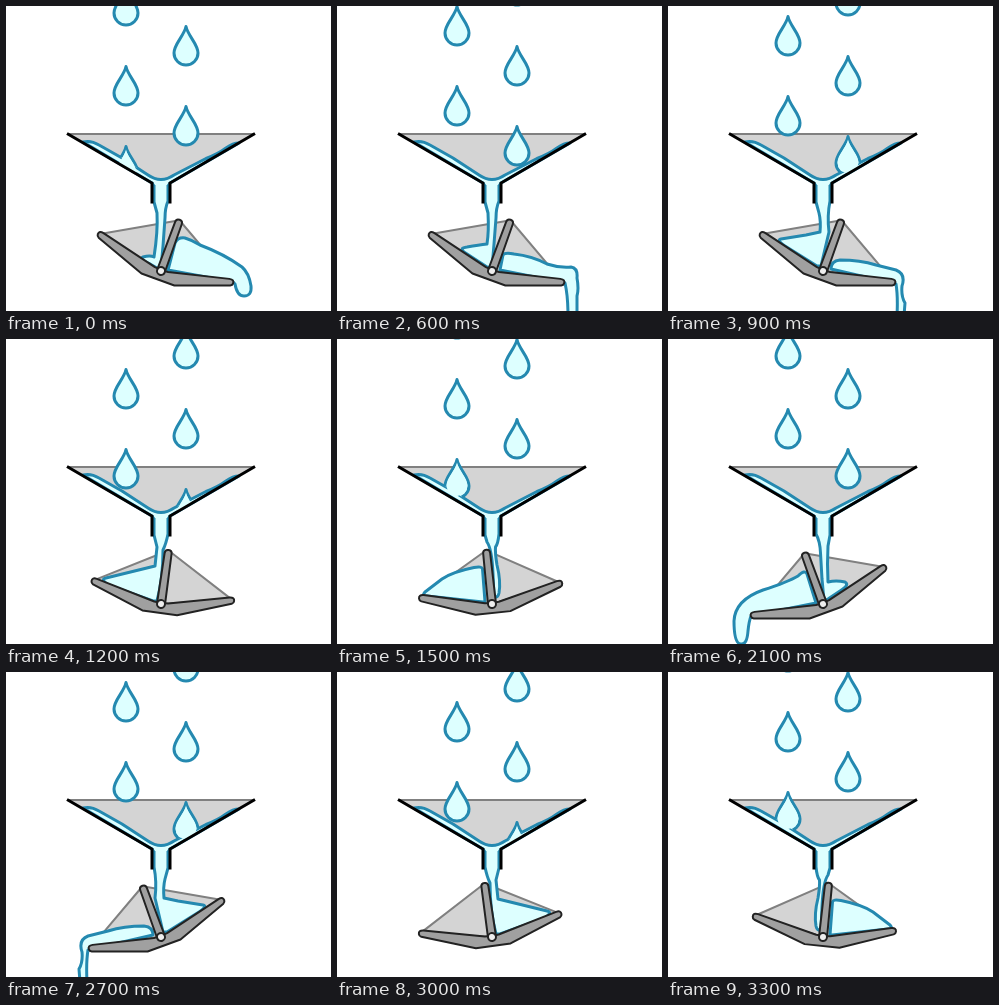
An HTML page with a canvas that plays this animation: 325 by 305 pixels, repeating every 3600 ms.

```html
<!DOCTYPE html>
<html lang="en">
<head>
<meta charset="utf-8">
<title>Tipping bucket rain gauge</title>
<style>
html, body { margin: 0; width: 100%; height: 100%; overflow: hidden; background: #fff; }
canvas { display: block; }
</style>
</head>
<body>
<canvas id="stage" width="325" height="305"></canvas>
<script>
const ctx = document.getElementById('stage').getContext('2d');
const WATER = '#dff', EDGE = '#2489b0', PALE = '#d4d4d4', METAL = '#a0a0a0', DARK = '#222';
const STEP_MS = 300, AXIS = 155, PIVOT_Y = 265;

// Half a cycle; the other half is the same with the bucket mirrored.
const fall = [0, 10, 20, 30, 50, 60];
const tilt = [20, 20, 20, 20, 8, -6];

// From the spout's right lip, round the filling pool, back up to its left lip.
const streams = [
  'Q159 202 159 212 L157 240 L155 262 L151 262 L144 258 Q132 253 137 251 Q144 249 148 251 Q152 225 151 207',
  'Q158 202 157.5 214 L156 240 L154 262 L150 260 L138 252 Q128 246 133 243 Q142 241 150 243 Q151 225 150 207',
  'Q159 202 159 212 L157 238 L155 262 L150 261 L127 246 Q122 242 130 241 Q142 239 150 238 Q152 225 151 207',
  'Q159 210 161 226 L153 260 L149 260 L117 240 Q108 234 113 233 L138 229 L152 226 Q153 215 151 207',
  'Q160 205 157 211 Q157 240 151 262 L147 262 L102 246 Q94 240 100 239 L149 227 L151 208',
  'Q161 205 158.5 208 Q158 214 160 226 Q164 242 162 254 Q161 259 157 258 L156 235 Q155 210 150 203'
];

// Water held in or leaving the full side.
const spills = [
  'M162 264 L169 237 Q172 231 179 232 Q186 234 194 239 Q218 248 236 261 Q243 267 245 280 Q246 290 238 290 Q231 290 229 278 L227 276 Z',
  'M162 264 L171 235 Q173 230 180 237 Q190 243 215 251 Q243 261 244 282 Q244 305 237 305 Q231 306 230 292 Q229 282 227 277 Z',
  'M163 264 L166 249 Q168 246 177 248 Q195 250 210 258 Q222 262 234 261 Q241 262 240 272 Q242 283 240 290 L240 310 L231 310 Q231 290 228 277 Z',
  'M163 263 Q163 255 172 254 Q192 254 208 259 L228 264 Q238 268 234 280 Q233 290 237 297 L236 310 L229 310 Q230 290 228 278 Z',
  '',
  'M148 263 L145.5 230 Q145 227 137 228.5 Q115 233 105 240 L88 253 Q84 258 90 257 L146 263 Z'
];

const surface = 'Q85 134 93 139 L116 152 L142 169 Q155 178 168 169 L200 152.5 Q212 148 220 142 Q227 137 233 137';
const funnelWater = new Path2D(`M148 180 L146 177 L77 136 ${surface} L164 177 L162 180`);
const aboveWater = new Path2D(`M77 136 ${surface} V0 H77 Z`);
const insideFunnel = new Path2D('M62 0 H248 V128 L164 177 H146 L62 128 Z');
const dropShape = new Path2D('M0 0.5 C2 10 12 18 12 27 A12 12 0 0 1 -12 27 C-12 18 -2 10 0 0.5 Z');
const bucketBack = new Path2D('M-70 -14 L0 -54 L70 -14 L0 0 Z');
const bucketBase = new Path2D('M0 -1 L-7 -1.5 L-67 -16 Q-72 -17 -72 -13 Q-72 -11 -70 -10 L-17.5 9 H17.5 L70 -10 Q72 -11 72 -13 Q72 -17 67 -16 L7 -1.5 Z');
const divider = new Path2D('M-4 -2 L-3.5 -51 Q-3.5 -54.5 0 -54.5 Q3.5 -54.5 3.5 -51 L4 -2 Z');
const hinge = new Path2D('M4 0 A4 4 0 1 1 -4 0 A4 4 0 1 1 4 0 Z');

function paint(path, fill, stroke, width) {
  if (fill) { ctx.fillStyle = fill; ctx.fill(path); }
  if (stroke) { ctx.strokeStyle = stroke; ctx.lineWidth = width; ctx.stroke(path); }
}

function isolated(draw) {
  ctx.save();
  draw();
  ctx.restore();
}

function drawFunnelBack() {
  paint(new Path2D('M62 128 H248 L164 177 H146 Z'), PALE);
  paint(new Path2D('M62 128 H248'), null, '#808080', 2);
  paint(funnelWater, WATER, EDGE, 3);
}

function drawFunnelWalls() {
  ctx.lineJoin = 'miter';
  paint(new Path2D('M61 127.5 L146 177 V197.5 M249 127.5 L164 177 V197.5'), null, '#000', 3);
  ctx.lineJoin = 'round';
}

function drawBucket(phase) {
  const inBucket = draw => isolated(() => {
    ctx.translate(AXIS, PIVOT_Y);
    ctx.rotate(tilt[phase] * Math.PI / 180);
    draw();
  });
  inBucket(() => paint(bucketBack, PALE, '#808080', 2));
  if (spills[phase]) paint(new Path2D(spills[phase]), WATER, EDGE, 3);
  paint(new Path2D(`M162 179 V195 ${streams[phase]} L148 196 V179`), WATER, EDGE, 3);
  inBucket(() => {
    paint(bucketBase, METAL, DARK, 2);
    paint(divider, METAL, DARK, 2);
    paint(hinge, '#eee', DARK, 2);
  });
}

function drawDrop(x, tip) {
  isolated(() => {
    ctx.translate(x, tip);
    paint(dropShape, WATER, EDGE, 3);
  });
}

// A drop joining the funnel water: outline above the surface, open below it.
function drawMergingDrop(x, tip) {
  isolated(() => {
    ctx.clip(aboveWater);
    drawDrop(x, tip);
  });
  isolated(() => {
    ctx.clip(insideFunnel);
    ctx.translate(x, tip + 24);
    ctx.scale(0.87, 0.87);
    ctx.translate(0, -24);
    paint(dropShape, WATER);
  });
}

function drawColumn(x, start, waterline) {
  for (let tip = start - 160; tip <= waterline + 30; tip += 80) {
    if (tip > waterline) drawMergingDrop(x, tip);
    else drawDrop(x, tip);
  }
}

function render(now) {
  const step = Math.floor(now / STEP_MS) % 12;
  const phase = step % 6;
  ctx.clearRect(0, 0, 325, 305);
  ctx.lineJoin = 'round';
  drawFunnelBack();
  isolated(() => {
    if (step >= 6) {
      ctx.translate(2 * AXIS, 0);
      ctx.scale(-1, 1);
    }
    drawBucket(phase);
  });
  drawColumn(120, 60 + fall[phase], 110);
  drawColumn(180, 100 + fall[phase], 120);
  drawFunnelWalls();
}

const begin = performance.now();
function tick() {
  render(performance.now() - begin);
  requestAnimationFrame(tick);
}
tick();
</script>
</body>
</html>
```
